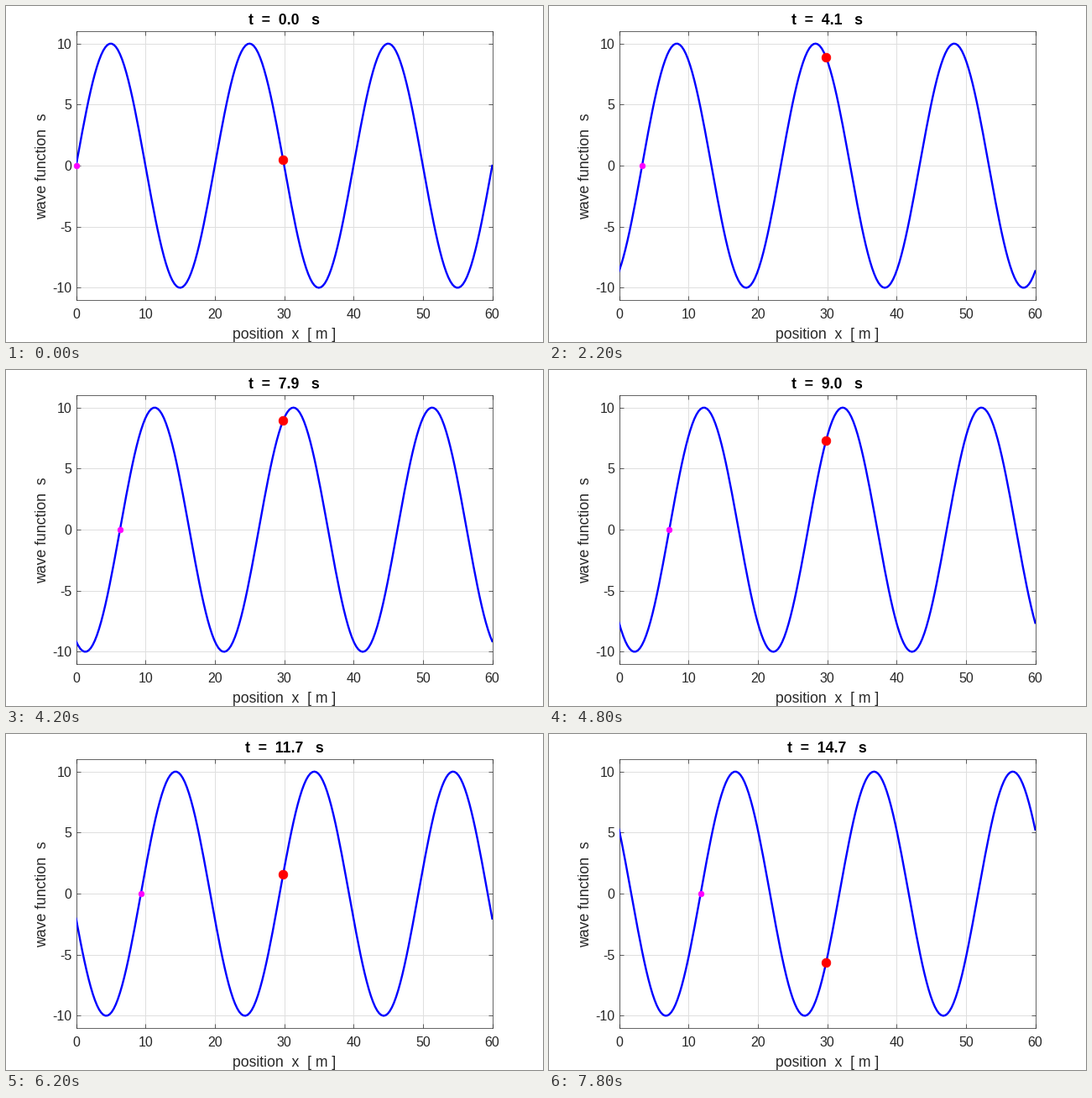
Write a matplotlib script that moves like this. It is 640x400 px and loops after 8 s.

```python
import matplotlib.pyplot as plt
import numpy as np
from matplotlib.animation import FuncAnimation

W, H, DPI = 640, 400, 100
FRAMES, INTERVAL = 40, 200
AMP, WAVELENGTH, PERIOD = 10, 20, 25
SPEED = WAVELENGTH / PERIOD
STEP = 3 * PERIOD / 199          # simulated seconds per frame
LEFT, RIGHT, TOP, BOTTOM = 83.5, 579.5, 30.2, 350.0
DARK = "#262626"

plt.rcParams["font.family"] = "Liberation Sans"


def pt(px):
    return px * 72 / DPI


def label(x, y, text, size, ha="center", color=DARK, **kw):
    """Place text by its baseline, in pixels from the top left."""
    return fig.text(x / W, 1 - y / H, text, fontsize=pt(size), ha=ha,
                    va="baseline", color=color, **kw)


fig = plt.figure(figsize=(W / DPI, H / DPI), dpi=DPI, facecolor="white")
ax = fig.add_axes([LEFT / W, 1 - BOTTOM / H,
                   (RIGHT - LEFT) / W, (BOTTOM - TOP) / H])
ax.set(xlim=(0, 60), ylim=(-11, 11),
       xticks=range(0, 61, 10), yticks=range(-10, 11, 5))
ax.set_axisbelow(True)
ax.grid(True, color="#dfdfdf", linewidth=pt(1))
ax.tick_params(direction="in", length=pt(5), width=pt(0.7), color=DARK,
               top=True, right=True, labelbottom=False, labelleft=False)
for spine in ax.spines.values():
    spine.set(color=DARK, linewidth=pt(0.7), zorder=1)

for v in range(0, 61, 10):
    label(LEFT + (RIGHT - LEFT) * v / 60, 372, str(v), 16)
for v in range(-10, 11, 5):
    y = BOTTOM - (BOTTOM - TOP) * (v + 11) / 22
    label(78.5, y + 6, str(v), 16, ha="right")
label(331.5, 396, "position  x  [ m ]", 17.6)
label(48, 191, "wave function  s", 17.6, rotation=90, rotation_mode="anchor")
title = label(331.5, 22.5, "", 17.6, color="black", weight="bold")

x = np.linspace(0, 60, 200)
probe = 99                       # grid point followed by the red dot
wave, = ax.plot([], [], color="blue", linewidth=pt(2.4), zorder=3)
red, = ax.plot([], [], "o", color="red", markersize=pt(10.7),
               markeredgewidth=pt(0.7), zorder=4)
pink, = ax.plot([], [], "o", color="magenta", markersize=pt(6.7),
                markeredgewidth=pt(0.7), zorder=5, clip_on=False)


def draw(i):
    t = i * STEP
    s = AMP * np.sin(2 * np.pi * (x / WAVELENGTH - t / PERIOD))
    wave.set_data(x, s)
    red.set_data([x[probe]], [s[probe]])
    pink.set_data([SPEED * t], [0])
    title.set_text(f"t  =  {t:.1f}   s")
    return wave, red, pink, title


anim = FuncAnimation(fig, draw, frames=FRAMES, interval=INTERVAL,
                     repeat=True, repeat_delay=0, blit=False)
plt.show()
```
